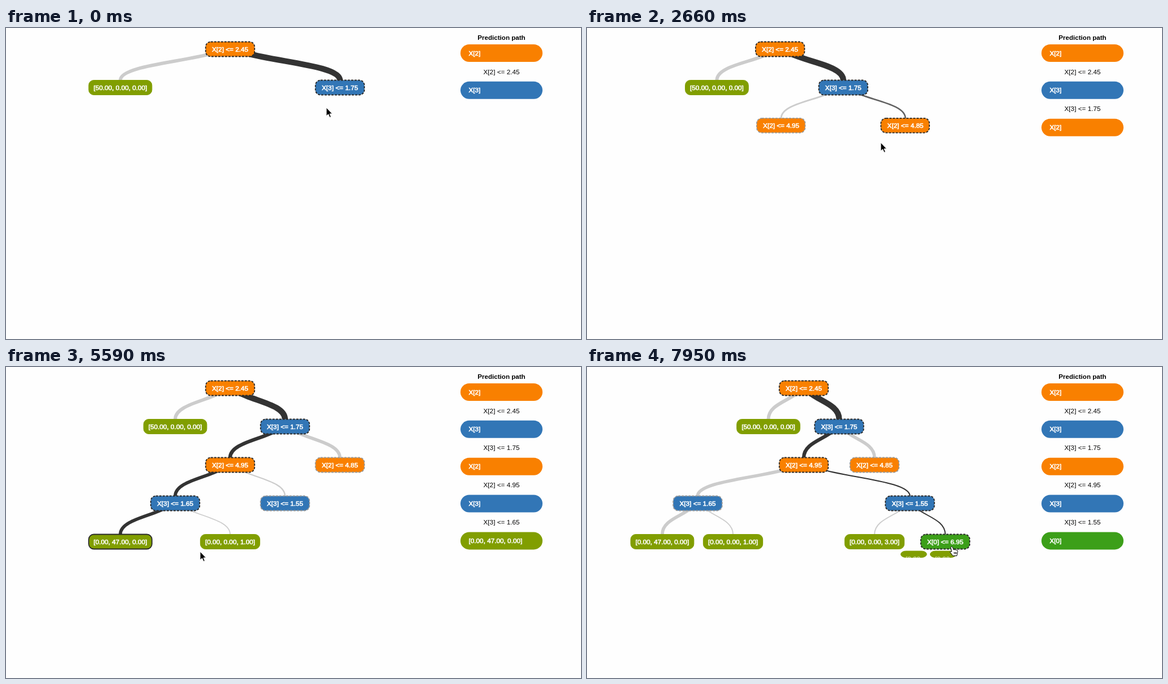
Recreate the animation shown at these times as an HTML page with a canvas. Size 1016 by 551 pixels, loop 8 s.

```html
<!DOCTYPE html>
<html lang="en">
<head>
<meta charset="utf-8">
<title>Decision tree</title>
<style>
html, body { margin: 0; width: 100%; height: 100%; overflow: hidden; background: #fefefe; }
canvas { display: block; }
</style>
</head>
<body>
<canvas id="stage" width="1016" height="551"></canvas>
<script>
const ctx = document.getElementById('stage').getContext('2d');
const LOOP = 8000, STEP = 147, MOVE = 750, GROW = 400, FADE = 300;
const TOP = 24.5, LEVEL = 68, BOX = 26, LEFT = 8, SPAN = 776;
const FONT = '11.75px "Liberation Sans", Arial, sans-serif';
const ORANGE = '#f98000', BLUE = '#3276b6', GREEN = '#3c9f19', OLIVE = '#819e00';
const FEATURE = { 'X[2]': ORANGE, 'X[3]': BLUE, 'X[0]': GREEN };

const clamp = v => Math.min(1, Math.max(0, v));
const mix = (a, b, p) => a + (b - a) * p;
const ease = v => (v = clamp(v)) < .5 ? 4 * v ** 3 : 1 - 4 * (1 - v) ** 3;
const last = (list, t) => list.findLastIndex(e => e[0] <= t);

// label, parent, samples
const nodes = [
  ['X[2] <= 2.45', -1, 150], ['[50.00, 0.00, 0.00]', 0, 50], ['X[3] <= 1.75', 0, 100],
  ['X[2] <= 4.95', 2, 54], ['X[2] <= 4.85', 2, 46], ['X[3] <= 1.65', 3, 48],
  ['X[3] <= 1.55', 3, 6], ['[0.00, 47.00, 0.00]', 5, 47], ['[0.00, 0.00, 1.00]', 5, 1],
  ['[0.00, 0.00, 3.00]', 6, 3], ['X[0] <= 6.95', 6, 3],
  ['[0.00, 2.00, 0.00]', 10, 2], ['[0.00, 0.00, 1.00]', 10, 1]
].map(([label, parent, samples]) => ({ label, parent, samples, leaf: label[0] === '[' }));

ctx.font = FONT;
nodes.forEach(n => {
  n.depth = n.parent < 0 ? 0 : nodes[n.parent].depth + 1;
  n.name = n.leaf ? n.label : n.label.slice(0, 4);
  n.color = FEATURE[n.name] || OLIVE;
  n.width = ctx.measureText(n.label).width + (n.leaf ? 17 : 22.5);
});

const narrow = [0, -.5, .5, 0, 1, -.5, .5, -1, 0];
const wide = [0, -.5, .5, 0, 1, -1.5, 1.5, -2, -1, 1, 2, 1.5, 2.5];

function layout(units, count) {
  const u = units.slice(0, count), lo = Math.min(...u), pad = count > 3 ? 1 : .5;
  const unit = SPAN / (Math.max(...u) - lo + 2 * pad);
  return u.map(v => LEFT + (v - lo + pad) * unit);
}

// time shown, time the move began, time new links thicken, x positions
const stages = [
  [0, -2000, -2000, layout(narrow, 3)],
  [600, 277, 1040, layout(narrow, 3)],
  [2010, 2010, 2480, layout(narrow, 5)],
  [3180, 3180, 3650, layout(narrow, 7)],
  [4600, 4600, 5070, layout(narrow, 9)],
  [6412, 6412, 6890, layout(wide, 11)],
  [7592, 7592, 8066, layout(wide, 13)]
];

// time, hovered node
const hovers = [[0, 2], [600, -1], [1700, 2], [2450, 4], [2900, 3], [4470, 5], [5160, 7], [5900, 6], [7100, 10]];

// time, x, y, shape
const pointer = [
  [0, 566, 141, 'arrow'], [1340, 566, 141, 'arrow'], [1640, 572, 118, 'arrow'],
  [1760, 575, 110, 'hand'], [2220, 575, 110, 'hand'], [2500, 555, 172, 'hand'],
  [2640, 519, 203, 'arrow'], [2700, 519, 203, 'arrow'], [2940, 375, 180, 'hand'],
  [3100, 352, 180, 'hand'], [3390, 352, 180, 'hand'], [3550, 340, 190, 'arrow'],
  [3980, 228, 257, 'arrow'], [4460, 228, 257, 'arrow'], [4560, 223, 246, 'hand'],
  [4720, 223, 246, 'hand'], [4900, 220, 265, 'arrow'], [5150, 215, 311, 'hand'],
  [5300, 235, 315, 'hand'], [5440, 290, 322, 'arrow'], [5580, 343, 327, 'arrow'],
  [5700, 343, 327, 'arrow'], [6000, 470, 250, 'hand'], [6180, 498, 245, 'beam'],
  [6760, 498, 245, 'beam'], [6860, 530, 275, 'arrow'], [7060, 608, 328, 'arrow'],
  [7200, 640, 320, 'hand'], [7350, 645, 318, 'hand']
];
const shapes = {
  arrow: ['M0 0V15L3.5 11.8L6 17.5L8.4 16.5L6 11H10.5Z', '#000', '#fff'],
  hand: ['M-2.5 1.5Q-.5-1 1 1.5L3 6Q4.5 4.5 5.5 6Q7 5 8 6.5Q9.5 6 10 8.5L9.5 12L8.5 16.5H1.5L-3.5 10Q-3.5 8-.5 9Z', '#fff', '#000'],
  beam: ['M-2.5-6Q0-6 0-4V4Q0 6-2.5 6M2.5-6Q0-6 0-4M0 4Q0 6 2.5 6', 'transparent', '#000']
};

function pathTo(i) {
  const path = [];
  for (; i >= 0; i = nodes[i].parent) path.unshift(i);
  return path;
}

function text(s, x, y, align, color) {
  ctx.textAlign = align;
  ctx.fillStyle = ctx.strokeStyle = color;
  ctx.fillText(s, x, y + 4);
  if (color === '#fff') {
    ctx.lineWidth = .6;
    ctx.strokeText(s, x, y + 4);
  }
}

function box(x, y, w, h, r, color) {
  ctx.beginPath();
  ctx.roundRect(x, y, w, h, { x: Math.min(r, w / 2), y: Math.min(r, h / 2) });
  ctx.fillStyle = color;
  ctx.fill();
}

function border(n, lit) {
  ctx.setLineDash(n.leaf ? [] : [4, 2]);
  ctx.lineWidth = n.leaf && !lit ? 1 : 1.8;
  ctx.strokeStyle = lit ? '#2b2b2b' : n.leaf ? n.color : '#999';
  ctx.stroke();
  ctx.setLineDash([]);
}

function drawTree(t, path, before, fade) {
  const s = last(stages, t), [, start, grow, goal] = stages[s];
  const old = s > 1 ? stages[s - 1][3] : [];
  const p = ease((t - start) / MOVE), thick = ease((t - grow) / GROW);
  const placed = goal.map((x, i) => {
    const { parent, depth } = nodes[i], fresh = i >= old.length;
    const from = old[i] ?? old[parent] ?? LEFT;
    const d = fresh ? mix(Math.max(0, depth - 1), depth, p) : depth;
    return { x: mix(from, x, p), y: TOP + LEVEL * d, size: fresh ? p : 1, thick: fresh ? thick : 1 };
  });

  placed.forEach((b, i) => {
    if (!i) return;
    const a = placed[nodes[i].parent], mid = (a.y + b.y) / 2;
    const gray = mix(204, 51, mix(before.includes(i), path.includes(i), fade));
    ctx.beginPath();
    ctx.moveTo(a.x, a.y);
    ctx.bezierCurveTo(a.x, mid, b.x, mid, b.x, b.y);
    ctx.lineWidth = mix(1, 1.7 + .086 * nodes[i].samples, b.thick);
    ctx.strokeStyle = `rgb(${gray},${gray},${gray})`;
    ctx.stroke();
  });

  placed.forEach(({ x, y, size }, i) => {
    const n = nodes[i];
    if (size <= .01) return;
    box(x - n.width / 2, y, n.width * size, BOX * size, 9, n.color);
    border(n, path.includes(i));
    ctx.globalAlpha = size;
    text(n.label, x, y + BOX / 2 + .5, 'center', '#fff');
    ctx.globalAlpha = 1;
  });
}

function drawPath(path) {
  if (!path.length) return;
  ctx.font = 'bold 11.6px "Liberation Sans", Arial, sans-serif';
  text('Prediction path', 875.5, 17, 'center', '#000');
  ctx.font = FONT;
  path.forEach((id, i) => {
    const n = nodes[id], y = 44.5 + 65.85 * i;
    box(803, y - 15.5, 145, 31, 15.5, n.color);
    text(n.name, 817.5, y, 'left', '#fff');
    if (i < path.length - 1) text(n.label, 875.5, y + 33, 'center', '#000');
  });
}

function drawPointer(t) {
  const i = last(pointer, t), a = pointer[i], b = pointer[i + 1] || a;
  const p = b === a ? 0 : (t - a[0]) / (b[0] - a[0]);
  const [d, fill, line] = shapes[a[3]], shape = new Path2D(d);
  ctx.save();
  ctx.translate(mix(a[1], b[1], p), mix(a[2], b[2], p));
  ctx.lineWidth = 1;
  ctx.fillStyle = fill;
  ctx.strokeStyle = line;
  ctx.fill(shape);
  ctx.stroke(shape);
  if (a[3] === 'hand') ctx.stroke(new Path2D('M3.5 10L4.2 13M5.5 10L6 13M7.3 10L7.5 13'));
  ctx.restore();
}

function draw(now) {
  const k = Math.floor((now % LOOP - 590) / STEP);
  const t = k < 0 ? 0 : 600 + STEP * k;
  const h = last(hovers, t), path = pathTo(hovers[h][1]);
  const before = h ? pathTo(hovers[h - 1][1]) : path;
  const fade = path.length ? clamp((t - hovers[h][0]) / FADE) : 1;
  ctx.fillStyle = '#fefefe';
  ctx.fillRect(0, 0, 1016, 551);
  drawTree(t, path, before, fade);
  drawPath(path);
  drawPointer(t);
}

const begin = performance.now();
function tick() {
  draw(performance.now() - begin);
  requestAnimationFrame(tick);
}
tick();
</script>
</body>
</html>
```
